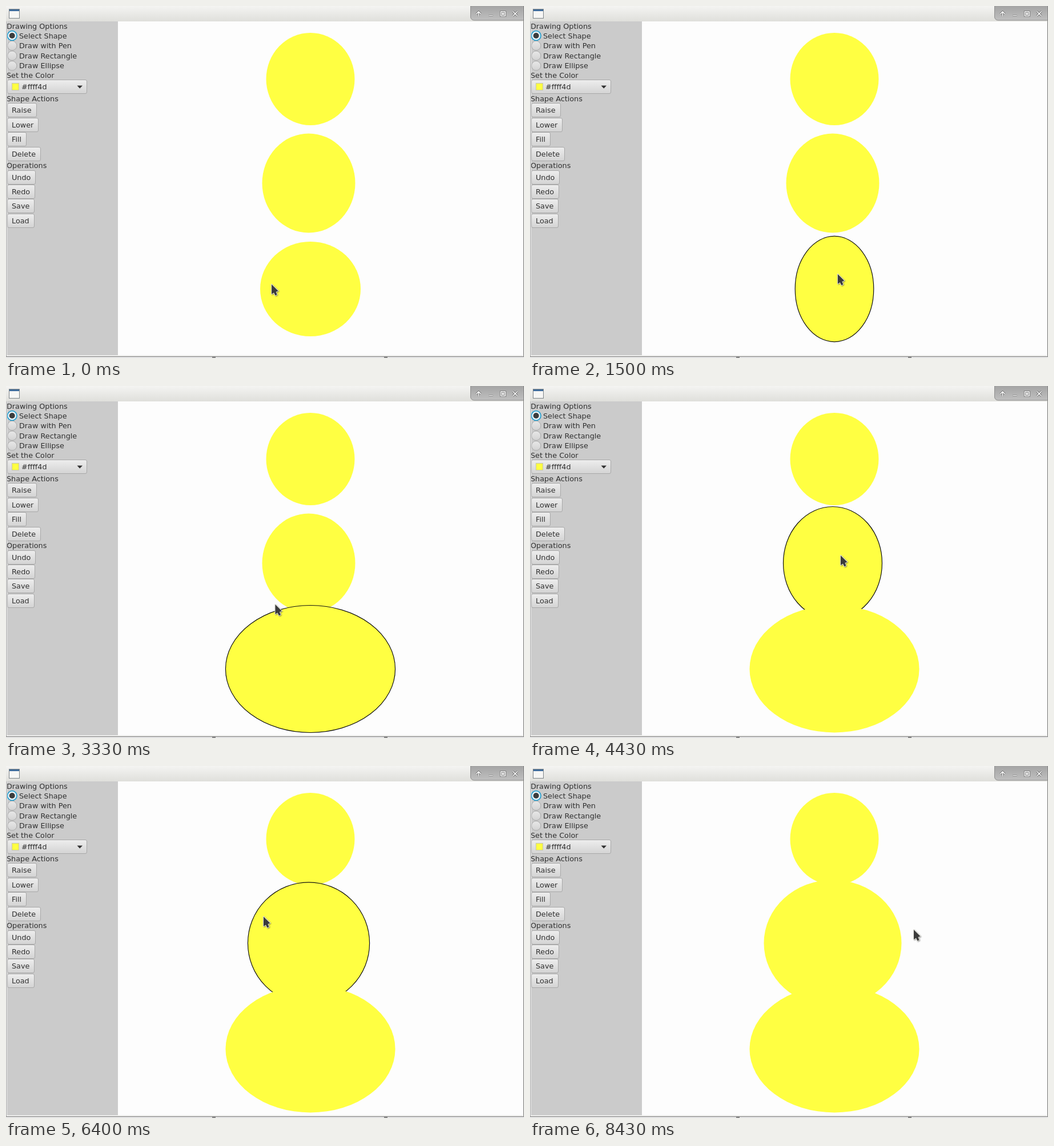
Write an HTML page with a canvas that moves like this. It is 907 by 617 pixels and loops after 8460 ms.

```html
<!DOCTYPE html>
<html lang="en">
<head>
<meta charset="utf-8">
<title>Drawing program</title>
<style>
html, body { margin: 0; width: 100%; height: 100%; overflow: hidden; background: #fdfdfd; }
canvas { display: block; }
</style>
</head>
<body>
<canvas id="stage" width="907" height="617"></canvas>
<script>
const LOOP = 8460, YELLOW = '#ffff42', INK = '#303030';
const GRAB_LOW = 380, DROP_LOW = 2850, GRAB_MID = 3900, DESELECT = 8110;
const ctx = document.getElementById('stage').getContext('2d');

// Turning points of the pointer and of the middle ellipse's radii
const pointerPath = [
  { t: 0, x: 465, y: 488 },
  { t: GRAB_LOW, x: 506, y: 486.5 },
  { t: 1500, x: 539, y: 470 },
  { t: 2370, x: 422, y: 437 },
  { t: DROP_LOW, x: 402.5, y: 437 },
  { t: GRAB_MID, x: 553, y: 319 },
  { t: 4430, x: 544, y: 297 },
  { t: 5430, x: 516, y: 279 },
  { t: 6400, x: 451, y: 264 },
  { t: 7000, x: 434, y: 258 },
  { t: 8000, x: 672, y: 287 }
];
const midRadii = [
  { t: GRAB_MID, x: 81.5, y: 87 },
  { t: 4430, x: 86.5, y: 99 },
  { t: 5430, x: 84, y: 99.5 },
  { t: 7000, x: 120.5, y: 111 }
];
const arrow = new Path2D('M0 0V17L4 14.5 6.5 19.5 9.5 18 7.5 13 11.5 11.5Z');
const windowIcons = new Path2D(
  'M827.5 18V10.5M823.5 14l4-4 4 4M845.5 16.5h7M866.5 10h7.5v7.5h-7.5z' +
  'M869 12.5h2.5v2.5h-2.5zM887.5 9.5l8 8m0-8l-8 8');

function sample(keys, t) {
  const i = keys.findIndex(k => k.t > t);
  const b = keys.at(i), a = i > 0 ? keys[i - 1] : b;
  const p = a === b ? 0 : (t - a.t) / (b.t - a.t);
  return { x: a.x + (b.x - a.x) * p, y: a.y + (b.y - a.y) * p };
}

function gradient(y, h, top, bottom) {
  const g = ctx.createLinearGradient(0, y, 0, y + h);
  g.addColorStop(0, top);
  g.addColorStop(1, bottom);
  return g;
}

function rect(x, y, w, h, fill) {
  ctx.fillStyle = fill;
  ctx.fillRect(x, y, w, h);
}

function text(str, x, y) {
  ctx.fillStyle = INK;
  ctx.fillText(str, x, y);
}

function paint(shape, fill, stroke, width = 1) {
  ctx.fillStyle = fill;
  ctx.fill(shape);
  if (!stroke) return;
  ctx.strokeStyle = stroke;
  ctx.lineWidth = width;
  ctx.stroke(shape);
}

function ellipse(x, y, rx, ry, ...style) {
  const shape = new Path2D();
  shape.ellipse(x, y, rx, ry, 0, 0, Math.PI * 2);
  paint(shape, ...style);
}

function panel(x, y, w, h, radius, ...style) {
  const shape = new Path2D();
  shape.roundRect(x, y, w, h, radius);
  paint(shape, ...style);
}

function button(y, label, x = 10, w = Math.round(ctx.measureText(label).width) + 17) {
  y = Math.round(y);
  panel(2.5, y + 0.5, w - 1, 24, 2.5, gradient(y, 24, '#eee', '#d4d4d4'), '#a8a8a8');
  text(label, x, y + 17);
}

function radio(y, label, on) {
  if (on) {
    ellipse(10.7, y, 8.3, 8.3, '#e9f4f9', '#2a9fcd', 1.8);
    ellipse(10.7, y, 5, 5, '#3c3c3c');
  } else {
    ellipse(10.7, y, 8.2, 8.2, gradient(y - 8, 16, '#e8e8e8', '#d2d2d2'), '#aaa');
  }
  text(label, 23, Math.round(y + 4.5));
}

function titleBar() {
  rect(0, 0, 907, 27, gradient(0, 27, '#f4f4f2', '#dfdfdb'));
  rect(5, 5, 19, 17, '#7d8488');
  rect(6, 6, 17, 15, '#f6f6f5');
  rect(6, 6, 17, 3, '#3f6c9c');
  panel(813.5, -5, 100, 30, 6, gradient(0, 25, '#a4a4a4', '#c0c0c0'), '#8d8d8d');
  paint(windowIcons, 'transparent', '#686868', 3.2);
  paint(windowIcons, 'transparent', '#fff', 1.6);
}

function sidebar() {
  rect(2, 27, 194, 585, '#cbcbcb');
  ctx.font = '12.8px "DejaVu Sans", sans-serif';
  text('Drawing Options', 1, 40);
  ['Select Shape', 'Draw with Pen', 'Draw Rectangle', 'Draw Ellipse']
    .forEach((label, i) => radio(52 + i * 17.6, label, i === 0));
  text('Set the Color', 1, 126);
  button(129, '#ffff4d', 27, 140);
  rect(10, 135, 13, 13, '#c6c6a4');
  rect(11, 136, 11, 11, YELLOW);
  paint(new Path2D('M124.5 139.5h9.5l-4.8 5z'), INK);
  text('Shape Actions', 1, 167);
  ['Raise', 'Lower', 'Fill', 'Delete'].forEach((label, i) => button(170.4 + i * 25.4, label));
  text('Operations', 1, 284);
  ['Undo', 'Redo', 'Save', 'Load'].forEach((label, i) => button(287.5 + i * 25.4, label));
}

function windowEdges() {
  rect(0, 27, 1, 587, '#a9a9a9');
  rect(1, 27, 1, 587, '#ececec');
  rect(905, 27, 1, 587, '#e4e4e2');
  rect(906, 0, 1, 614, '#858585');
  rect(1, 612, 905, 2, '#eeeeec');
  rect(0, 614, 907, 1, '#7d7d7d');
  rect(0, 615, 907, 2, '#e6e6e6');
  for (const x of [361, 662]) rect(x, 615, 6, 2, '#8a8a8a');
}

function shapes(t) {
  const drag = sample(pointerPath, Math.min(Math.max(t, GRAB_LOW), DROP_LOW));
  const mid = sample(midRadii, Math.max(t, GRAB_MID));
  const outline = on => on && '#111';
  ellipse(533, 128, 77.5, 81, YELLOW);
  ellipse(530, 310.5, mid.x, mid.y, YELLOW, outline(t >= GRAB_MID && t < DESELECT), 1.2);
  // Dragging away from the grab point resizes the low ellipse about its centre
  ellipse(533, 496, 88 + (506 - drag.x) * 0.585, 83 + (486.5 - drag.y) * 0.576,
    YELLOW, outline(t >= GRAB_LOW && t < GRAB_MID), 1.2);
}

function pointer({ x, y }) {
  ctx.save();
  ctx.translate(x, y);
  ctx.lineJoin = 'round';
  ctx.shadowColor = 'rgba(0,0,0,.3)';
  ctx.shadowBlur = 2;
  ctx.shadowOffsetX = ctx.shadowOffsetY = 1;
  paint(arrow, '#e8e8e0', '#e8e8e0', 1.8);
  ctx.restore();
  ctx.save();
  ctx.translate(x, y);
  paint(arrow, '#3b3b3b');
  ctx.restore();
}

function draw(t) {
  rect(0, 0, 907, 617, '#fdfdfd');
  titleBar();
  sidebar();
  windowEdges();
  shapes(t);
  pointer(sample(pointerPath, t));
}

const start = performance.now();
function tick() {
  draw((performance.now() - start) % LOOP);
  requestAnimationFrame(tick);
}
tick();
</script>
</body>
</html>
```
